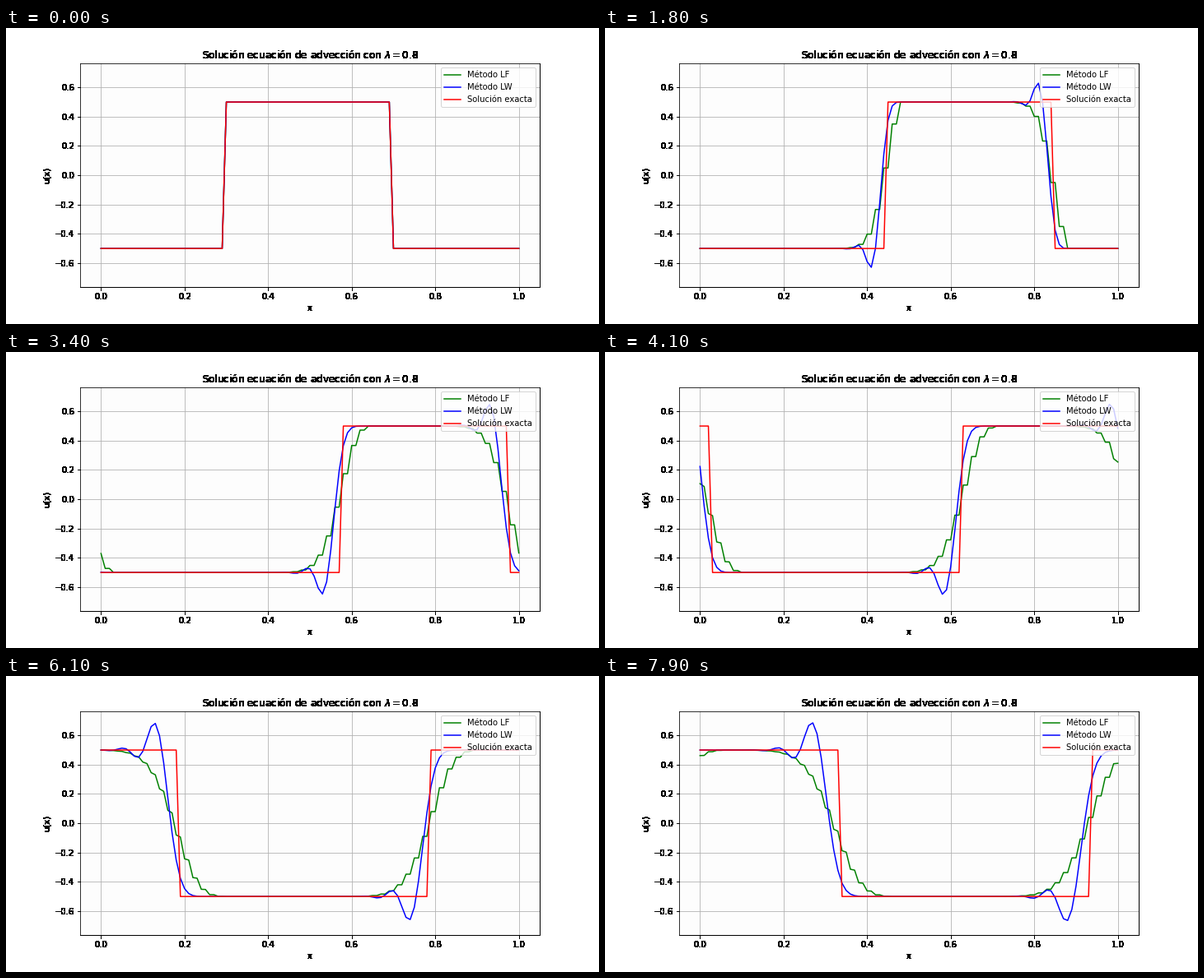
Recreate the animation shown at these times as a matplotlib script. Size 720 by 360 pixels, loop 8 s.

```python
import numpy as np
import matplotlib.pyplot as plt
from matplotlib.animation import FuncAnimation

FRAMES, INTERVAL = 80, 100
N, LAM = 100, 0.8

plt.rcParams.update({"font.family": "DejaVu Sans", "font.size": 10})

x = np.linspace(0, 1, N + 1)
cells = np.arange(N + 1)


def exact(step):
    """Square pulse carried along by LAM cells per step, in tenths of a cell."""
    pos = (10 * cells - 8 * step) % (10 * N)
    return np.where((pos >= 300) & (pos < 700), 0.5, -0.5)


def neighbours(u):
    left = np.roll(u, 1)
    right = np.append(u[1:], u[1])
    return left, right


def lax_friedrichs(u):
    left, right = neighbours(u)
    return (left + right) / 2 - LAM / 2 * (right - left)


def lax_wendroff(u):
    left, right = neighbours(u)
    return u - LAM / 2 * (right - left) + LAM**2 / 2 * (right - 2 * u + left)


def evolve(scheme):
    states = [exact(0)]
    for _ in range(FRAMES - 1):
        states.append(scheme(states[-1]))
    return states


def solid_ink(image, dpi):
    """Turn every touched pixel fully black."""
    out = np.zeros_like(image)
    out[..., 3] = image[..., 3] > 0
    return out, 0, 0


curves = [
    evolve(lax_friedrichs),
    evolve(lax_wendroff),
    [exact(k) for k in range(FRAMES)],
]

fig = plt.figure(figsize=(10, 5), dpi=72, facecolor="white")
fig.subplots_adjust(left=0.125, right=0.9, bottom=0.125, top=0.88)
ax = fig.add_subplot(facecolor="#fdfdfd")

styles = [("g", "Método LF"), ("b", "Método LW"), ("r", "Solución exacta")]
lines = [ax.plot(x, u[0], color=c, lw=1.5, label=name)[0]
         for u, (c, name) in zip(curves, styles)]

ax.set_xticks(np.linspace(0, 1, 6))
ax.set_yticks(np.linspace(-0.6, 0.6, 7))
ax.set_xlim(-0.05, 1.05)
ax.set_ylim(-0.763, 0.763)
ax.set_title(r"Solución ecuación de advección con $\lambda=0.8$", fontsize=12)
ax.set_xlabel("x")
ax.set_ylabel("u(x)")
ax.grid(True)
ax.legend(loc="upper right")

# Lettering and marks outside the plot area have hard, unsmoothed edges.
hard = [ax.title, ax.xaxis.label, ax.yaxis.label,
        ax.spines["right"], ax.spines["bottom"]]
for axis in (ax.xaxis, ax.yaxis):
    for tick in axis.get_major_ticks():
        hard += [tick.label1, tick.tick1line]
for artist in hard:
    artist.set_agg_filter(solid_ink)


def update(k):
    for line, u in zip(lines, curves):
        line.set_ydata(u[k])
    return lines


anim = FuncAnimation(fig, update, frames=FRAMES, interval=INTERVAL,
                     repeat=True, repeat_delay=0, blit=False)
plt.show()
```
